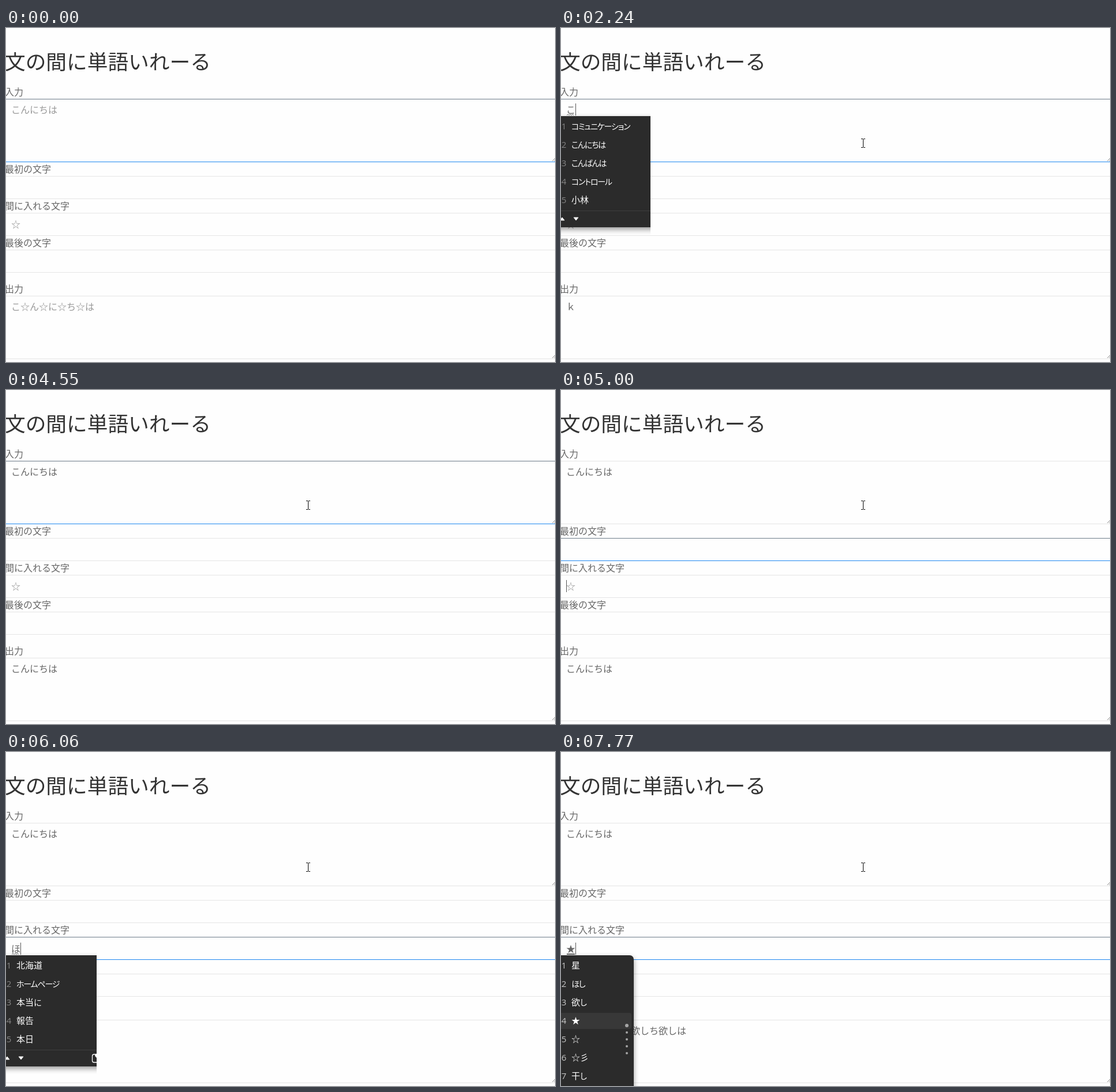
These frames come from a looping animation (951x580 px, 8000 ms). An HTML page:

```html
<!DOCTYPE html>
<html lang="ja">
<head>
<meta charset="utf-8">
<style>
  html, body { margin: 0; width: 100%; height: 100%; overflow: hidden; background: #fefefe; }
  svg { display: block; }
  text { font-family: "Noto Sans CJK JP", "Noto Sans CJK", "Noto Sans", sans-serif; font-size: 16px; fill: #666; white-space: pre; }
  .title { font-size: 35.7px; fill: #333; }
  .hint { fill: #999; }
  .item { font-size: 15px; fill: #fff; }
  .kana { font-size: 14px; letter-spacing: -1.2px; font-feature-settings: "palt"; }
  .digit { font-family: "Open Sans", "Noto Sans", sans-serif; font-size: 15px; text-anchor: middle; }
  .popup { filter: drop-shadow(0 4px 5px rgba(0, 0, 0, .4)); }
</style>
</head>
<body>
<svg id="stage" width="951" height="580" viewBox="0 0 951 580"></svg>
<script>
const LOOP = 8000, FADE = 150, GREETING = 'こんにちは';
const stage = document.getElementById('stage');

const fields = [[123, 232], [257, 296], [321, 360], [385, 424], [465, 574]];
const labels = [['入力', 117], ['最初の文字', 251], ['間に入れる文字', 315], ['最後の文字', 379], ['出力', 459]];
const mixed = word => [...GREETING].join(word);

const lists = {
  k: { w: 138, items: ['確認', '今日', '会社', '株式会社', '期間'] },
  ko: { w: 193, items: ['コミュニケーション', 'こんにちは', 'こんばんは', 'コントロール', '小林'] },
  kon: { w: 193, items: ['こんにちは', 'こんばんは', 'コントロール', 'コンピューター', 'コンサルティング'] },
  h: { w: 138, items: ['方法', '本日', '報告', '必要', '変更'] },
  ho: { w: 172, items: ['北海道', 'ホームページ', '本当に', '報告', '本日'] },
  hoshi: { w: 183, items: ['欲しい', 'ほしい', '星', '保証', '保守'] },
  star: { w: 126, full: true, items: ['星', 'ほし', '欲し', '★', '☆', '☆彡', '干し', '保志', '星'] }
};

// Each step changes part of the state from its time on.
const steps = [
  [0, { input: '', word: '', out: '', caret: -1, line: '', list: '', pick: -1, clip: 951 }],
  [710, { caret: 0 }], [1240, { caret: -1 }], [1770, { caret: 0 }],
  [2080, { input: 'ｋ', line: 'wave', list: 'k' }],
  [2240, { input: 'こ', out: 'ｋ', list: 'ko', clip: 155 }], [2270, { clip: 951 }],
  [2570, { input: 'こｎ', out: 'こ' }],
  [2740, { input: 'こん', out: 'こｎ', list: 'kon' }],
  [3250, { caret: -1 }],
  [3450, { input: GREETING, out: 'こん', caret: 0, line: 'solid', pick: 0 }],
  [3980, { line: '', list: '', pick: -1 }], [4010, { out: GREETING }],
  [4550, { caret: -1 }], [4650, { caret: 1 }], [5000, { caret: 2 }], [5480, { caret: -1 }],
  [5730, { word: 'ｈ', caret: 2, line: 'wave', list: 'h' }],
  [6060, { word: 'ほ', out: mixed('ｈ'), list: 'ho', clip: 157 }], [6090, { clip: 951 }],
  [6290, { word: 'ほｓ' }],
  [6550, { word: 'ほし', out: mixed('ほｓ'), list: 'hoshi' }],
  [6930, { word: '星', out: mixed('ほし'), line: 'solid', list: '' }],
  [7160, { word: 'ほし', out: mixed('星'), list: 'star', pick: 1 }],
  [7540, { word: '欲し', out: mixed('ほし'), pick: 2 }],
  [7770, { word: '★', out: mixed('欲し'), pick: 3 }]
];

const ramp = (t, start, length = FADE) => Math.min(1, Math.max(0, (t - start) / length));
const mix = (a, b, k) => `rgb(${a.map((v, i) => Math.round(v + (b[i] - v) * k))})`;
const text = (x, y, s, cls = '') => `<text x="${x}" y="${y}" class="${cls}">${s}</text>`;
const rect = (x, y, w, h, fill, r = 0) => `<rect x="${x}" y="${y}" width="${w}" height="${h}" rx="${r}" fill="${fill}"/>`;
const path = (d, stroke, width = 1, fill = 'none') => `<path d="${d}" stroke="${stroke}" stroke-width="${width}" fill="${fill}"/>`;
const dot = (x, y, r) => `<circle cx="${x}" cy="${y}" r="${r}" fill="#a5a5a5"/>`;

function page(t) {
  const focus = [1 - ramp(t, 30) + ramp(t, 710) - ramp(t, 4650), ramp(t, 4650) - ramp(t, 5000), ramp(t, 5000), 0, 0];
  const idle = [229, 229, 229];
  let s = text(-2, 72, '文の間に単語いれーる', 'title');
  for (const [label, y] of labels) s += text(-2, y, label);
  fields.forEach(([top, bottom], i) => {
    s += rect(0, top, 951, 1, mix(idle, [108, 122, 136], focus[i]));
    s += rect(0, bottom, 951, 1, mix(idle, [30, 135, 240], focus[i]));
  });
  for (const y of [231, 573]) s += path(`M946.5 ${y}l5-5M950 ${y}l2-2`, '#777');
  return s;
}

function entry(value, hint, y) {
  return text(9, y, value || hint, value ? '' : 'hint');
}

function composition(state) {
  const second = state.caret === 2 || state.word;
  const end = 9 + 16 * (second ? state.word : state.input).length;
  const y = second ? 351 : 151;
  if (state.line === 'solid') return rect(10, y - 1, end - 11, 2, '#666');
  if (state.line !== 'wave') return '';
  return path(`M10 ${y + .5}` + 'l2-1.5l2 1.5'.repeat((end - 10) / 4), '#777');
}

function caret({ caret, input, word }) {
  if (caret < 0) return '';
  const value = [input, '', word][caret];
  return rect(9 + 16 * value.length, [131, 266, word ? 331 : 330][caret], 1, 21, '#555');
}

function popup({ list, pick, clip, word }) {
  if (!list) return '';
  const { w, items, full } = lists[list];
  const top = word ? 353 : 153, foot = top + 4 + 32 * items.length;
  let s = `<g class="popup">${rect(-20, top, w + 20, foot + 29 - top, '#2b2b2b', 7)}</g>`;
  if (pick >= 0) s += rect(-20, top + 4 + 32 * pick, w + 16, 28, '#383838', 4);
  items.forEach((item, i) => {
    const y = top + 23 + 32 * i;
    const shade = pick < 0 ? '#858585' : '#c8c8c8';
    s += `<text x="5" y="${y}" class="digit" style="fill:${shade}">${i + 1}</text>`;
    s += text(18, y, item.replace(/[ぁ-ヿ]+/g, '<tspan class="kana">$&</tspan>'), 'item');
  });
  const middle = top + 2 + 16 * items.length;
  for (let i = 0; i < 5; i++) s += dot(w - 12, middle - 24 + 12 * i, i ? 2 : 3);
  s += rect(0, foot, w, 1, '#3f3f3f');
  s += path(`M-2 ${foot + 17}h8l-4-5zM22 ${foot + 12}h8l-4 5z`, '#fff', .8, '#fff');
  if (!full) {
    const x = w - 22.5, y = foot + 8;
    s += path(`M${x + 7} ${y}h-4q-3 0-3 3v8q0 3 3 3h8q3 0 3-3v-3`, '#fff', 1.3);
    s += path(`M${x + 10} ${y + 8}l-4-4a2.6 2.6 0 0 1 4-4a2.6 2.6 0 0 1 4 4z`, '#fff', 1, '#fff');
    if (pick >= 0) {
      const cy = top + 18;
      s += path(`M${w - 67} ${cy - 4}l8 8m0-8l-8 8`, '#ccc', 1.1);
      s += `<circle cx="${w - 39.5}" cy="${cy - 1.5}" r="3.5" fill="none" stroke="#ccc"/>`;
      s += path(`M${w - 37} ${cy + 1}l4 4`, '#ccc', 1.1);
    }
  }
  return `<svg width="${clip}" height="580">${s}</svg>`;
}

function pointer(t) {
  if (t < 30) return '';
  const left = (1 - ramp(t, 30, 380)) ** 2;
  const x = 523.5 + 110 * left, y = 200 + 325 * left;
  const beam = `M${x - 3.5} ${y - 7.5}h3m1 0h3M${x} ${y - 7}v14M${x - 3.5} ${y + 7.5}h3m1 0h3`;
  return path(beam, '#fff', 2.6) + path(beam, '#000');
}

function draw(now) {
  const t = now % LOOP;
  const state = Object.assign({}, ...steps.filter(([at]) => at <= t).map(step => step[1]));
  stage.innerHTML = page(t)
    + entry(state.input, GREETING, 148)
    + entry(state.word, '☆', state.word ? 348 : 347)
    + entry(state.out, mixed('☆'), 490)
    + composition(state) + caret(state) + popup(state) + pointer(t);
}

const start = performance.now();
function tick() {
  draw(performance.now() - start);
  requestAnimationFrame(tick);
}
tick();
</script>
</body>
</html>
```
